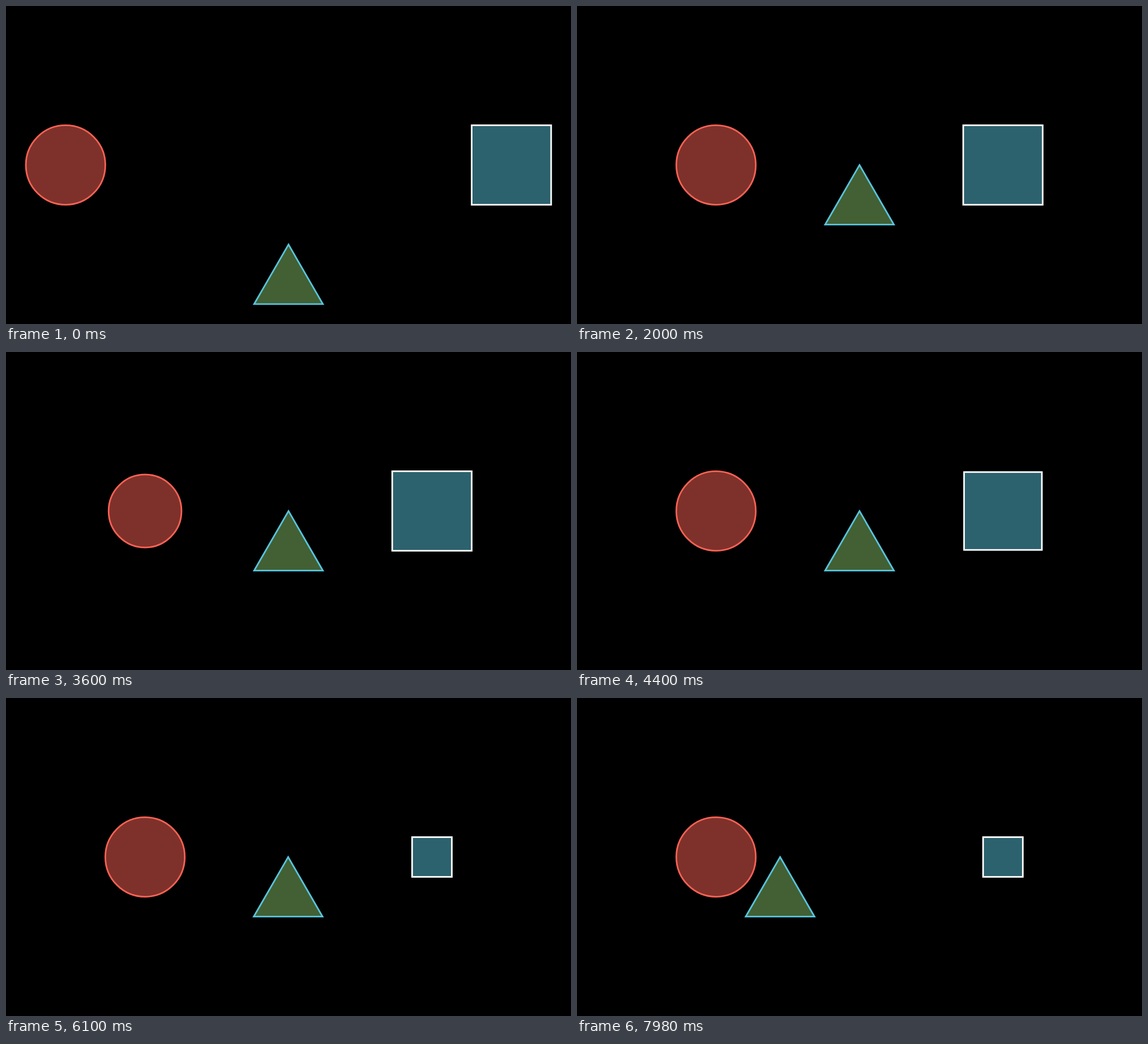
Recreate the animation shown at these times as an HTML page. Size 998 by 561 pixels, loop 8 s.

```html
<!DOCTYPE html>
<html lang="en">
<head>
<meta charset="utf-8">
<title>Moving shapes</title>
<style>
  html, body { margin: 0; width: 100%; height: 100%; overflow: hidden; background: #000; }
  svg { display: block; width: 100vw; height: 100vh; }
  svg * { stroke-width: 5.4; vector-effect: none; }
</style>
</head>
<body>
<svg viewBox="0 0 1920 1080" preserveAspectRatio="none">
  <circle id="circle" cy="540" fill="#7e312a" stroke="#fc6255"/>
  <rect id="square" fill="#2c626e" stroke="#fff"/>
  <polygon id="triangle" fill="#426033" stroke="#58c4dd" stroke-miterlimit="10"/>
</svg>
<script>
const LOOP = 8000, STEP = 20, UNIT = 135, CX = 960, CY = 540;
const EDGE = CX - 1.5 * UNIT;   // start distance of circle and square from the centre
const [circle, square, triangle] =
  ["circle", "square", "triangle"].map(id => document.getElementById(id));

const sigmoid = x => 1 / (1 + Math.exp(-x));
const tail = sigmoid(-5);

// Eased progress, 0 to 1, of a move that begins at start and lasts length ms
function ease(t, start, length) {
  const a = Math.min(1, Math.max(0, (t - start) / length));
  return (sigmoid(10 * (a - 0.5)) - tail) / (1 - 2 * tail);
}

function set(el, attrs) {
  for (const key in attrs) el.setAttribute(key, attrs[key]);
}

function draw(t) {
  const inward = 2 * UNIT * ease(t, 0, 1000);

  // Half a turn with straight point paths: shrinks through the centre and back
  const turn = Math.abs(1 - 2 * ease(t, 2000, 2000));
  set(circle, { cx: CX - EDGE + inward, r: UNIT * turn });

  const half = UNIT * (1 - 0.5 * ease(t, 4000, 2000));
  set(square, {
    x: CX + EDGE - inward - half, y: CY - half,
    width: 2 * half, height: 2 * half
  });

  const x = CX - 2 * UNIT * ease(t, 6000, 2000);
  const top = CY + 2 * UNIT - inward, base = top + 1.5 * UNIT;
  const side = UNIT * Math.sqrt(3) / 2;
  set(triangle, { points: `${x},${top} ${x + side},${base} ${x - side},${base}` });
}

function tick() {
  const t = performance.now() % LOOP;
  draw(Math.floor(t / STEP) * STEP);
  requestAnimationFrame(tick);
}
tick();
</script>
</body>
</html>
```
